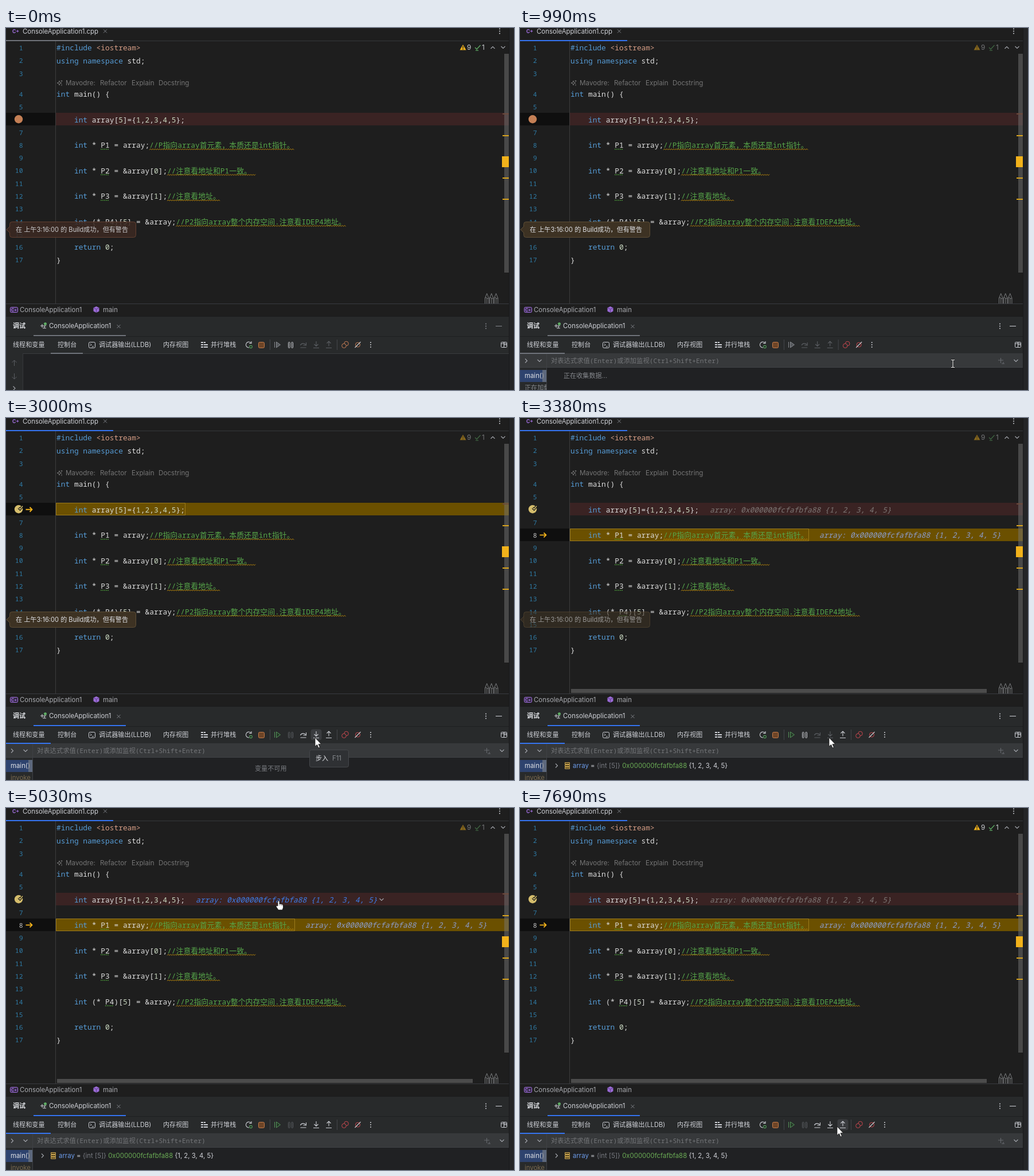
An HTML page with a canvas that plays this animation: 886 px wide and 632 px high, repeating every 8 s.

```html
<!DOCTYPE html>
<html lang="zh">
<head>
<meta charset="utf-8">
<title>Debugger session</title>
<style>
html, body { margin: 0; width: 100%; height: 100%; overflow: hidden; background: #1e1e1e; }
canvas { display: block; }
</style>
</head>
<body>
<canvas id="stage" width="886" height="632"></canvas>
<script>
const g = document.getElementById('stage').getContext('2d');
const CJK = '"Noto Sans CJK SC","Noto Sans CJK",sans-serif';
const UI = `11.1px Inter,${CJK}`;
const LABEL = `11.4px Inter,${CJK}`;
const SMALL = `11.7px Inter,${CJK}`;
const mono = px => `${px}px "Noto Sans Mono",${CJK}`;
const CODE = mono(12.88);
const LIGHT = '#ced0d6', DIM = '#5b5e63', GRAY = '#6f737a', BLUE = '#3574f0',
  GREEN = '#5fad65', KEYWORD = '#569cd6', AMBER = '#f2b21b', PANEL = '#282a2b', PURPLE = '#a571e6';

const source = {
  1: '#include <iostream>',
  2: 'using namespace std;',
  4: 'int main() {',
  6: '    int array[5]={1,2,3,4,5};',
  8: '    int * P1 = array;//P指向array首元素，本质还是int指针。',
  10: '    int * P2 = &array[0];//注意看地址和P1一致。 ',
  12: '    int * P3 = &array[1];//注意看地址。',
  14: '    int (* P4)[5] = &array;//P2指向array整个内存空间.注意看IDEP4地址。',
  16: '    return 0;',
  17: '}'
};
const HINT = 'array: 0x000000fcfafbfa88 {1, 2, 3, 4, 5}';

// Pointer stops: time, shape, x, y
const stops = [
  [0], [660, 'arrow', 756, 616], [990, 'beam', 755, 586], [1320, 'beam', 670, 577],
  [1650, 'arrow', 506, 566], [2320, 'arrow', 536, 563], [2660, 'arrow', 539, 558],
  [4040, 'beam', 558, 83], [4370, 'beam', 504, 171], [4700, 'beam', 490, 170],
  [5030, 'hand', 477, 170], [6030, 'hand', 446, 173], [6370, 'hand', 592, 174],
  [6700, 'arrow', 549, 568], [7030, 'arrow', 535, 568], [7360, 'arrow', 548, 564],
  [7690, 'arrow', 553, 556]
];

const rowY = n => n < 4 ? 12.6 + 22.3 * n : 115.7 + 22.28 * (n - 4);
const rowTop = n => Math.floor(rowY(n) - 11.7);

function rect(x, y, w, h, color) {
  g.fillStyle = color;
  g.fillRect(x, y, w, h);
}

// Draws text centred on y and returns its right end.
function text(s, x, y, color = LIGHT, font = UI, align = 'left') {
  g.font = font;
  g.fillStyle = color;
  g.textAlign = align;
  g.fillText(s, x, Math.round(y + 4));
  return x + g.measureText(s).width;
}

function path(d, x, y, stroke, fill, width = 1) {
  const p = new Path2D(d);
  g.save();
  g.translate(x, y);
  if (fill) { g.fillStyle = fill; g.fill(p); }
  if (stroke) { g.strokeStyle = stroke; g.lineWidth = width; g.stroke(p); }
  g.restore();
}

function disc(x, y, r, fill, stroke) {
  g.beginPath();
  g.arc(x, y, r, 0, 7);
  if (fill) { g.fillStyle = fill; g.fill(); }
  if (stroke) { g.strokeStyle = stroke; g.lineWidth = 1; g.stroke(); }
}

function box(x, y, w, h, r, fill, stroke) {
  g.beginPath();
  g.roundRect(x + .5, y + .5, w - 1, h - 1, r);
  if (fill) { g.fillStyle = fill; g.fill(); }
  if (stroke) { g.strokeStyle = stroke; g.lineWidth = 1; g.stroke(); }
}

const dots = (x, y, color, gap = 4) => [-gap, 0, gap].forEach(d => disc(x, y + d, 1, color));
const cross = (x, y) => path('M-3-3L3 3M3-3L-3 3', x, y, '#7d8086');
const chevron = (x, y, dir, color = '#a4a7ad') => path({
  up: 'M-3.5 2L0-1.5 3.5 2', down: 'M-3.5-2L0 1.5 3.5-2', right: 'M-2-3.5L1.5 0-2 3.5'
}[dir], x, y, color, null, 1.1);

function squiggle(x, end, y) {
  g.beginPath();
  for (let i = 0; x + i * 2 <= end; i++) g.lineTo(x + i * 2, y + (i % 2 ? -1 : 1));
  g.strokeStyle = '#b8860b';
  g.lineWidth = 1;
  g.stroke();
}

function codeLine(n) {
  const y = rowY(n);
  let x = 88;
  const tokens = source[n].match(/\/\/.*|<\w+>|#?\w+|\s+|./g);
  for (const s of tokens) {
    const comment = s.startsWith('//');
    const color = comment ? '#57a64a' : s[0] === '<' && s[1] ? '#d69d85'
      : /^(#include|using|namespace|int|return)$/.test(s) ? KEYWORD
      : /^\d/.test(s) ? '#c9d8c0' : '#dcdcdc';
    const end = text(s, x, y + .4, color, CODE);
    if (comment) squiggle(x, end, y + 7);
    if (/^P\d/.test(s)) for (let i = 0; i < 15; i += 3) rect(x + i, y + 6, 1.5, 1.6, '#4fa83d');
    x = end;
  }
}

function highlight(n, color, frameEnd) {
  rect(87, rowTop(n), 790, 22, color);
  if (frameEnd) box(87, rowTop(n), frameEnd - 87, 22, 0, null, '#9c7a1c');
}

function hint(n, x, color) {
  text(HINT, x, rowY(n) + .4, color, 'italic ' + CODE);
}

function tabBar(t) {
  text('C+', 11, 5, PURPLE, `bold 8.5px Inter,${CJK}`);
  text('ConsoleApplication1.cpp', 29, 6, LIGHT, LABEL);
  cross(173, 5.5);
  dots(861, 5.5, LIGHT);
  rect(0, 22, 878, 1, '#35373b');
  rect(0, 21, 187, 2, t < 990 ? GRAY : BLUE);
}

function inspections(t) {
  g.globalAlpha = t >= 330 && t < 5700 ? .5 : 1;
  path('M0-5L5.5 4.5H-5.5Z', 797, 34, null, AMBER);
  rect(796.3, 31.5, 1.4, 4, '#1e1e1e');
  rect(796.3, 36.3, 1.4, 1.4, '#1e1e1e');
  text('9', 804, 34.3, LIGHT, SMALL);
  path('M-5 0L-2 3 4.5-4M-4 5.2H1', 823, 34, GREEN, null, 1.3);
  text('1', 830, 34.3, LIGHT, SMALL);
  g.globalAlpha = 1;
  chevron(849, 34, 'up');
  chevron(867, 34, 'down');
}

function breakpoint(paused) {
  const x = 22, y = rowY(6) - 1, check = 'M0-2.5L2.5 0 7-5.5';
  disc(x, y, 7.2, paused ? '#d5bd6c' : '#c47f55');
  if (!paused) return;
  path(check, x, y, '#141414', null, 4);
  path(check, x, y, '#d5bd6c', null, 1.5);
}

function editor(t, hovered) {
  const paused = t >= 1320, stepped = t >= 3380;
  const current = stepped ? 8 : 6;
  rect(0, rowTop(current), 86, 22, '#0f0f0f');
  rect(86, 23, 1, 458, '#3c3c3c');
  if (!paused || stepped) highlight(6, '#3a2323');
  if (paused) highlight(current, '#6b5000', stepped ? 504 : 313);

  for (let n = 1; n <= 17; n++) {
    if (n !== 6) text(n, 29.5, rowY(n), stepped && n === 8 ? '#c8c8c8' : '#2f7ba6', mono(11.4), 'right');
    if (source[n]) codeLine(n);
  }
  path('M-1-4L0-1 3 0 0 1-1 4-2 1-5 0-2-1ZM3-5V-2M1.5-3.5H4.5M3 2V5', 94, 96, '#777', null, .9);
  ['Mavodre:', 'Refactor', 'Explain', 'Docstring'].forEach((s, i) =>
    text(s, [104, 164, 219, 266][i], 96, '#747474', SMALL));

  breakpoint(paused);
  if (paused) path('M-6 0H5M1-4L5 0 1 4', 40.5, rowY(current) - .5, AMBER, null, 1.8);
  if (stepped) {
    hint(6, 331, hovered ? '#3d7de8' : '#7d7775');
    hint(8, 522, '#8b9dcf');
    if (hovered) chevron(655, 160, 'down');
    rect(89, 473, 725, 7, '#4b4b4b');
  }

  rect(869, 45, 8, 382, 'rgba(120,120,120,.48)');
  rect(866, 149, 11, 2, '#6a4a3c');
  for (const y of [187, 261, 298]) rect(866, y, 11, 2, '#d9a31c');
  rect(865, 224, 12, 19, AMBER);
  for (const x of [835.5, 843.5, 851.5])
    path('M0 18V8L3.2 0 6.4 8V18M0 8Q1.6 6 3.2 8T6.4 8M3.2 8V18', x, 463.5, '#85878a', null, .9);
}

function balloon(t) {
  if (t >= 3710) return;
  const early = t < 330;
  g.globalAlpha = early ? .88 : t < 3380 ? 1 : .6;
  const fill = early ? '#3b2822' : '#3d3223', edge = early ? '#6a4434' : '#5e4e36';
  box(6, 338, 221, 28, 4, fill, edge);
  path('M6.5-6L.5 0 6.5 6', .5, 352, edge, fill);
  text('在 上午3:16:00 的 Build成功，但有警告', 17, 352, '#dfe1e5');
  g.globalAlpha = 1;
}

function breadcrumbs() {
  rect(0, 481, 878, 1, '#393b40');
  box(7, 487, 14, 10, 2, '#352a45', PURPLE);
  text('C+', 9, 491, PURPLE, `bold 7px Inter,${CJK}`);
  text('ConsoleApplication1', 24, 492.4, '#a9abb0', LABEL);
  path('M0-5.5L5-3V3L0 5.5-5 3V-3Z', 157.5, 491.5, null, '#9a6ad6');
  path('M-5-3L0-.5 5-3M0-.5V5.5', 157.5, 491.5, '#5b3f85');
  text('main', 169, 492.4, '#a9abb0', LABEL);
}

function toolbar(t) {
  const loading = t >= 330 && t < 1320;
  const paused = t >= 1320;
  const busy = t >= 1320 && t < 1650 || t >= 3380 && t < 3710;
  const shift = loading ? -22.3 : 0;
  const step = paused && !busy ? LIGHT : DIM;

  text('线程和变量', 12, 553);
  text('控制台', 90, 553);
  box(144, 548, 12, 11, 2, null, LIGHT);
  path('M-3-2L-1 0-3 2M0 3H3', 150, 553, LIGHT);
  text('调试器输出(LLDB)', 162, 553);
  text('内存视图', 274, 553);
  for (const y of [548, 552, 556]) {
    rect(340, y, 4, 2, LIGHT);
    rect(345, y, y > 550 ? 7 : 3, 2, LIGHT);
  }
  text('并行堆栈', 357, 553);
  path('M4-3.5A5 5 0 1 0 1 5M5-6V-2.5H1', 423, 553, LIGHT, null, 1.1);
  disc(427, 556.5, 2.5, '#263b2a', GREEN);
  box(440, 548, 11, 11, 2, '#6e4527', '#c77d4a');
  rect(460, 544, 1, 18, '#43454a');
  path('M-5-5V5M-2-5L5 0-2 5Z', 473.5, 553, paused ? '#549159' : '#85888d',
    paused ? '#253a28' : '#55585c');
  if (!loading) for (const x of [492, 497.5]) box(x, 548, 3.5, 11, 1, null, busy || !paused ? LIGHT : DIM);

  const hover = t >= 7690 ? 563 : t >= 2320 && t < 3380 ? 541 : 0;
  if (hover) box(hover - 10, 543, 20, 20, 4, '#3a3c3f');
  path('M-5 1A5 4.5 0 0 1 4 0M5-4V1H0M-5 5H5', 518.5 + shift, 553, step, null, 1.1);
  path('M0-6V2.5M-3.5-1L0 2.5 3.5-1M-5 5.5H5', 541 + shift, 553, step, null, 1.1);
  path('M0 2.5V-6M-3.5-2.5L0-6 3.5-2.5M-5 5.5H5', 563 + shift, 553, paused ? LIGHT : DIM, null, 1.1);
  rect(577 + shift, 544, 1, 18, '#43454a');
  const mark = t < 330 ? '#c77d55' : '#c9484f';
  disc(593.5 + shift, 551, 3.8, null, mark);
  disc(589.5 + shift, 554.8, 3.8, PANEL, mark);
  disc(613.5 + shift, 553, 4, null, mark);
  path('M-5 5L5-5', 613.5 + shift, 553, LIGHT, null, 1.1);
  dots(636 + shift, 553, LIGHT);
  box(863, 548, 11, 10, 1, null, LIGHT);
  path('M0-5V5M0 0H5M-5-2H5', 868.5, 553, LIGHT);
}

function consolePane() {
  rect(0, 568, 29, 64, PANEL);
  rect(29, 568, 1, 64, '#36383b');
  path('M0 5V-5M-4-1L0-5 4-1', 14.5, 585, DIM);
  path('M0-5V5M-4 1L0 5 4 1', 14.5, 608, DIM);
  chevron(14.5, 629, 'right');
}

function variablesPane(t) {
  rect(0, 592, 46, 40, PANEL);
  rect(0, 569, 877, 23, '#37393b');
  rect(0, 592, 878, 1, '#404246');
  rect(46, 569, 1, 63, '#3f4145');
  chevron(11, 581, 'right');
  chevron(34, 581, 'down');
  text('对表达式求值(Enter)或添加监视(Ctrl+Shift+Enter)', 54, 581, '#747679', mono(11.3));
  path('M-5-1H4M-.5-5V4M1 5H6M4 2V5', 839, 581, '#66696e', null, 1.1);
  chevron(865, 581, 'down');

  rect(0, 597, 46, 21, '#2e436e');
  text('main()', 8, 607.4, '#dfe1e5', LABEL);
  g.save();
  g.beginPath();
  g.rect(0, 593, 46, 39);
  g.clip();
  if (t < 1320) text('正在加载', 8, 628, '#85888d');
  else text('invoke', 8, 628, '#78694f', LABEL);
  g.restore();
  rect(39, 597, 7, 21, 'rgba(125,128,135,.6)');

  if (t < 1320) text('正在收集数据...', 76, 607.4, '#85888d');
  else if (t < 3380) text('变量不可用', 434, 612, '#7a7d82');
  else {
    chevron(64, 607, 'right');
    for (const y of [601, 605, 609]) box(78, y, 9, 4, 0, '#57461c', '#c9a452');
    let x = 92;
    [['array', '#6c9be8'], [' = ', LIGHT], ['{int [5]} ', '#777a80'],
      ['0x000000fcfafbfa88', '#6aab55'], [' {1, 2, 3, 4, 5}', LIGHT]]
      .forEach(([s, color]) => x = text(s, x, 607.4, color, LABEL));
  }
}

function debugPanel(t) {
  const accent = t < 1320 ? GRAY : BLUE;
  rect(0, 504, 878, 64, PANEL);
  rect(0, 503, 878, 1, '#1a1b1c');
  rect(0, 538, 878, 1, '#1e1f21');
  text('调试', 12, 520.4, '#dfe1e5', `bold 11.1px Inter,${CJK}`);
  path('M-5 0H5M-2-3V3M2 0V4M-1 4H5', 65, 520, LIGHT, null, 1.1);
  disc(68.5, 516.5, 2.5, GREEN);
  text('ConsoleApplication1', 75, 520.4, LIGHT, LABEL);
  cross(196.5, 521);
  rect(48, 536, 161, 2, accent);
  const icon = t < 660 ? '#85888d' : LIGHT;
  dots(837, 520.5, icon);
  rect(854, 520, 11, 1, icon);
  toolbar(t);
  rect(0, 568, 878, 1, '#393b3e');
  rect(0, 569, 878, 63, '#202123');
  if (t < 330) {
    consolePane();
    rect(78, 567, 56, 2, accent);
  } else {
    variablesPane(t);
    rect(0, 567, 78, 2, accent);
  }
  if (t >= 3000 && t < 3380) {
    box(529, 579, 69, 31, 3, '#2f3134', '#45474b');
    text('步入', 540, 594, '#dfe1e5');
    text('F11', 569, 594, '#85888d', LABEL);
  }
}

function pointer([, shape, x, y]) {
  if (shape === 'arrow')
    path('M0 0V15.5L3.6 12.3 6 18 8.4 17 6 11.4H10.8Z', x, y, '#111', '#fff', .8);
  if (shape === 'beam') {
    const d = 'M-3-6.5H-1L0-6 1-6.5H3M0-6V6M-3 6.5H-1L0 6 1 6.5H3';
    path(d, x, y, '#111', null, 2.4);
    path(d, x, y, '#fff', null, 1.1);
  }
  if (shape === 'hand') {
    path('M-3-7Q-1.5-9 0-7V-2L1-3 3-2 4-2.5 5.5-1 6.5-1V4L5 8H-2L-6 2Q-6-.5-3 1Z',
      x, y, '#111', '#fff', .8);
    path('M0-2V1M3-2V1M5-1V1', x, y, '#555', null, .6);
  }
}

function draw(now) {
  const t = now % 8000;
  const hovered = t >= 4370 && t < 4700 || t >= 5030 && t < 6700;
  rect(0, 0, 886, 632, '#1e1e1e');
  tabBar(t);
  editor(t, hovered);
  inspections(t);
  balloon(t);
  breadcrumbs();
  debugPanel(t);
  rect(878, 0, 8, 632, '#242527');
  rect(877, 0, 1, 632, '#191a1b');
  pointer(stops.findLast(s => s[0] <= t));
}

const start = performance.now();
function loop() {
  draw(performance.now() - start);
  requestAnimationFrame(loop);
}
loop();
</script>
</body>
</html>
```
